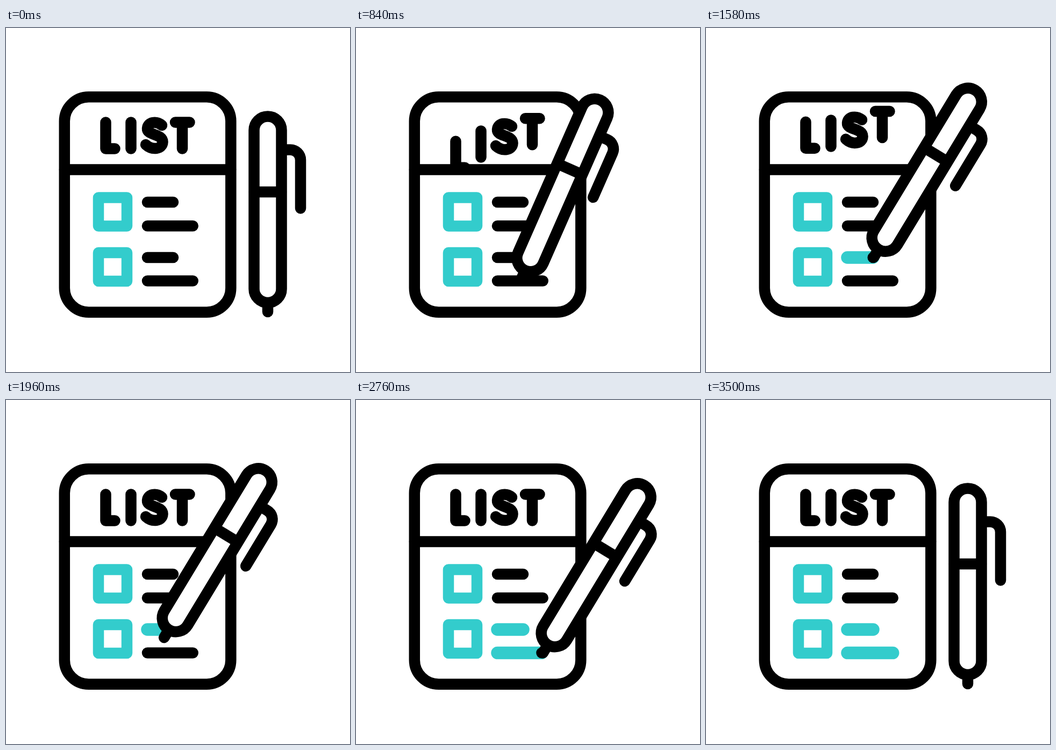
Recreate the animation shown at these times as an HTML page with a canvas. Size 640 by 640 pixels, loop 3.62 s.

```html
<!DOCTYPE html>
<html lang="en">
<head>
<meta charset="utf-8">
<title>List and pen</title>
<style>
  html, body { margin: 0; width: 100%; height: 100%; overflow: hidden; background: #fff; }
  canvas { display: block; width: 640px; height: 640px; }
</style>
</head>
<body>
<canvas id="stage" width="640" height="640"></canvas>
<script>
const ctx = document.getElementById('stage').getContext('2d');
const LOOP = 3620, STROKE = 20.5, INK = '#000', TEAL = '#33cccc';
const TILT = 31.2 * Math.PI / 180;

const LETTERS = [
  'M185.5 175.5V224.5H202.5',
  'M232.5 175.5V224.5',
  'M290 181C280 173 264 174 263 187C262 200 291 196 291.5 212C291 226 272 228 260 217',
  'M315 175.5H341.5M328 175.5V224.5'
].map(d => new Path2D(d));
const LETTER_DELAY = 72;

// Pen parts, with the writing tip at the origin.
const penBody = new Path2D();
penBody.roundRect(-25.5, -363.5, 51, 346.5, 25.5);
const penTip = new Path2D('M0 -17V0');
const penBand = new Path2D('M-25 -223H25');
const penClip = new Path2D('M27 -301.5H42A19 19 0 0 1 61 -282.5V-192.5');

const REST = [487, 528];
const ROW1 = [[261, 426.5], [312.5, 426.5]];
const ROW2 = [[261, 470], [350.5, 470]];

// Each move: start and end time, points of a quadratic curve, tilt from and to.
const MOVES = [
  { t: [500, 1000], path: [REST, [354, 521], ROW1[0]], tilt: [0, 1] },
  { t: [1200, 1600], path: straight(...ROW1), tilt: [1, 1] },
  { t: [1800, 2200], path: straight(ROW1[1], ROW2[0]), tilt: [1, 1] },
  { t: [2400, 2800], path: straight(...ROW2), tilt: [1, 1] },
  { t: [3000, 3500], path: [ROW2[1], [410, 519], REST], tilt: [1, 0] }
];

function straight(a, b) {
  return [a, [(a[0] + b[0]) / 2, (a[1] + b[1]) / 2], b];
}

function mix(a, b, s) {
  return a + (b - a) * s;
}

function ease(time, [start, end]) {
  const p = Math.min(1, Math.max(0, (time - start) / (end - start)));
  return p * p * (3 - 2 * p);
}

function stroke(path, color = INK, width = STROKE) {
  ctx.strokeStyle = color;
  ctx.lineWidth = width;
  ctx.stroke(path);
}

function bar(x1, x2, y, color, width) {
  stroke(new Path2D(`M${x1} ${y}H${x2}`), color, width);
}

function box(x, y, w, h, r, color) {
  const path = new Path2D();
  path.roundRect(x, y, w, h, r);
  stroke(path, color);
}

// Winds up, drops below the header, then glides in from above.
function letterOffset(time) {
  if (time <= 0) return 0;
  if (time < 1040) {
    const p = time / 1085;
    return 150 * p * p * (2.70158 * p - 1.70158);
  }
  return -Math.pow(0.01125 * Math.max(0, 1662 - time), 2.5);
}

function drawLetters(time) {
  ctx.save();
  ctx.beginPath();
  ctx.rect(109, 128, 309, 135.5);
  ctx.clip();
  LETTERS.forEach((path, i) => {
    ctx.save();
    ctx.translate(0, letterOffset(time - i * LETTER_DELAY));
    stroke(path);
    ctx.restore();
  });
  ctx.restore();
}

function writtenRow(x1, x2, y, progress) {
  const x = mix(x1, x2, progress);
  if (progress > 0) bar(x1, x, y, TEAL, 23.5);
  if (progress < 1) bar(x, x2, y);
}

function drawPen(time) {
  const move = MOVES.filter(m => time >= m.t[0]).pop() || MOVES[0];
  const s = ease(time, move.t);
  const [a, b, c] = move.path;
  const at = k => mix(mix(a[k], b[k], s), mix(b[k], c[k], s), s);
  ctx.save();
  ctx.translate(at(0), at(1));
  ctx.rotate(TILT * mix(...move.tilt, s));
  stroke(penClip);
  stroke(penTip);
  ctx.fillStyle = '#fff';
  ctx.fill(penBody);
  stroke(penBody);
  stroke(penBand);
  ctx.restore();
}

function draw(time) {
  ctx.fillStyle = '#fff';
  ctx.fillRect(0, 0, 640, 640);
  ctx.lineCap = ctx.lineJoin = 'round';

  drawLetters(time);
  box(108.8, 128.3, 309.5, 400.5, 45);
  bar(109, 418, 263.5);
  box(172, 315.4, 53, 53, 0, TEAL);
  box(172, 418, 53, 53, 0, TEAL);

  bar(263, 311, 324);
  bar(263, 347.7, 368.3);
  writtenRow(263, 311, 427, ease(time, MOVES[1].t));
  writtenRow(263, 347.7, 470.6, ease(time, MOVES[3].t));
  drawPen(time);
}

function tick() {
  draw(performance.now() % LOOP);
  requestAnimationFrame(tick);
}
tick();
</script>
</body>
</html>
```
